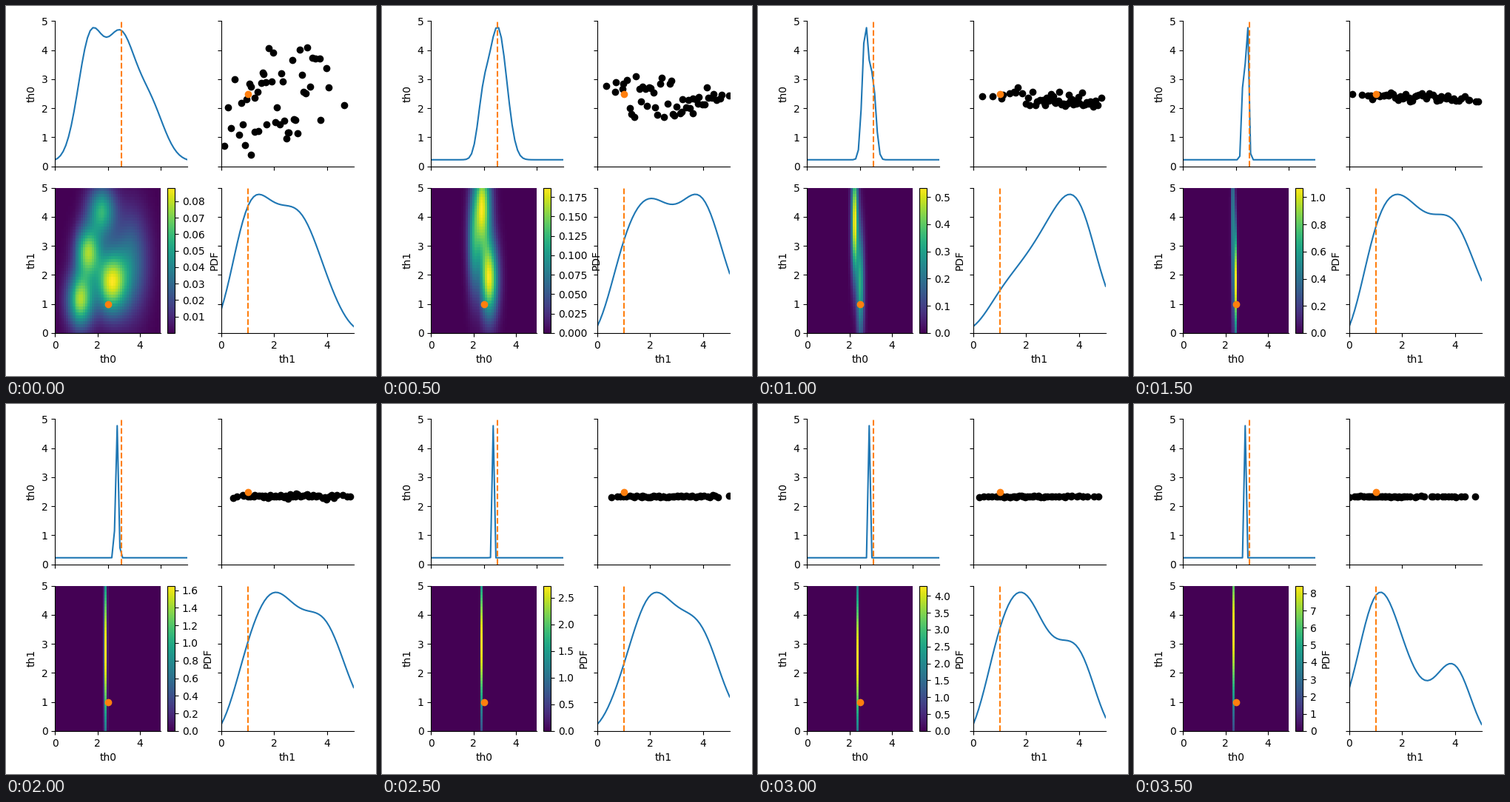
Recreate the animation shown at these times as a matplotlib script. Size 500x500 px, loop 4000 ms.

```python
import numpy as np
import matplotlib.pyplot as plt
from matplotlib.animation import FuncAnimation
from matplotlib.ticker import MaxNLocator

SIZE, DPI, INTERVAL = 500, 100, 500
TRUE_TH0, TRUE_TH1 = 2.5, 1.0
LEFT, RIGHT, LOWER, UPPER = 66.25, 290.8, 58.1, 283.3
WIDTH, HEIGHT = 179, 196.3
POINTS = 50
BANDWIDTH = 0.7

grid = np.linspace(0, 5, 50)
knots = np.arange(6)

# Per generation: peak density, th1 heights at 0..5,
# and lobes of the joint density as (th0, th1, sd0, sd1, height).
generations = [
    (0.0882, [.13, .92, .955, .87, .39, 0],
     [(2.6, 1.7, .5, .75, .85), (1.5, 2.75, .4, .6, .75),
      (1.15, 1.1, .42, .65, .8), (2.15, 4.15, .45, .6, .6),
      (3.55, 2.4, .55, 1.2, .35)]),
    (0.187, [0, .66, .99, .95, .985, .41],
     [(2.38, 4.3, .28, 1.1, 1), (2.7, 1.8, .28, .9, 1),
      (1.95, 3, .2, 1.2, .5)]),
    (0.534, [0, .275, .555, .885, .955, .31],
     [(2.2, 3.8, .115, 1.3, 1), (2.48, 1.6, .12, 1.3, .6)]),
    (1.07, [0, .745, .985, .85, .785, .345],
     [(2.44, 1.7, .045, 1.3, 1), (2.3, 3.6, .06, 2, .55)]),
    (1.65, [0, .62, 1, .88, .77, .28], [(2.335, 2.7, .05, 2, 1)]),
    (2.725, [0, .455, .98, .9, .725, .21], [(2.335, 3, .025, 1.8, 1)]),
    (4.3, [.05, .75, 1, .7, .6, .1], [(2.335, 2.5, .017, 1.9, 1)]),
    (8.44, [.275, .982, .67, .335, .45, 0], [(2.335, 3.4, .012, 2, 1)]),
]


def bell(x, mean, sd):
    return np.exp(-((x - mean) / sd) ** 2 / 2)


def th1_density(heights):
    """Sum of equal bells passing through the heights at the knots."""
    def basis(x):
        return bell(x[:, None], knots, BANDWIDTH)
    return basis(grid) @ np.linalg.solve(basis(knots), heights)


def th0_density(lobes):
    return sum(h * sd1 * bell(grid, th0, sd0) for th0, _, sd0, sd1, h in lobes)


def joint_density(lobes, peak):
    heat = sum(h * np.outer(bell(grid, th1, sd1), bell(grid, th0, sd0))
               for th0, th1, sd0, sd1, h in lobes)
    heat = heat[:-1, :-1]
    return heat / heat.max() * peak


def draw_samples(heights, lobes, seed):
    """Spread th1 by its density, then pick th0 from the lobes near it."""
    rng = np.random.default_rng(seed)
    cdf = np.cumsum(np.maximum(th1_density(heights), 0))
    ranks = (np.arange(POINTS) + rng.random(POINTS)) / POINTS
    th1 = np.interp(ranks, cdf / cdf[-1], grid)
    mean0, mean1, sd0, sd1, height = np.transpose(lobes)
    odds = height * bell(th1[:, None], mean1, sd1)
    odds /= odds.sum(axis=1, keepdims=True)
    pick = [rng.choice(len(lobes), p=p) for p in odds]
    th0 = rng.normal(mean0[pick], 0.8 * sd0[pick])
    return th0, th1


def panel(x, y, xlabel="", ylabel=""):
    ax = fig.add_axes([x / SIZE, y / SIZE, WIDTH / SIZE, HEIGHT / SIZE])
    ax.set(xlim=(0, 5), ylim=(0, 5), xticks=[0, 2, 4], yticks=range(6),
           xlabel=xlabel, ylabel=ylabel)
    ax.spines[["top", "right"]].set_visible(False)
    ax.tick_params(labelbottom=bool(xlabel), labelleft=bool(ylabel))
    return ax


def plot_density(ax, curve, true_value):
    unit = (curve - curve.min()) / np.ptp(curve)
    ax.plot(grid, 5 * (unit + 0.05) / 1.1, color="C0")
    ax.axvline(true_value, color="C1", linestyle="dashed")


def draw(gen):
    fig.clf()
    peak, heights, lobes = generations[gen]

    plot_density(panel(LEFT, UPPER, ylabel="th0"), th0_density(lobes), TRUE_TH0)
    plot_density(panel(RIGHT, LOWER, xlabel="th1"), th1_density(heights), TRUE_TH1)

    ax = panel(RIGHT, UPPER)
    th0, th1 = draw_samples(heights, lobes, seed=gen)
    ax.scatter(th1, th0, color="k")
    ax.scatter([TRUE_TH1], [TRUE_TH0], color="C1")

    ax = panel(LEFT, LOWER, "th0", "th1")
    mesh = ax.pcolormesh(grid, grid, joint_density(lobes, peak), cmap="viridis")
    ticks = MaxNLocator(9, steps=[1, 2, 2.5, 5, 10])
    fig.colorbar(mesh, ax=ax, ticks=ticks).set_label("PDF")
    ax.scatter([TRUE_TH0], [TRUE_TH1], color="C1")
    return []


fig = plt.figure(figsize=(SIZE / DPI, SIZE / DPI), dpi=DPI)
anim = FuncAnimation(fig, draw, frames=len(generations), interval=INTERVAL,
                     repeat=True)
plt.show()
```
